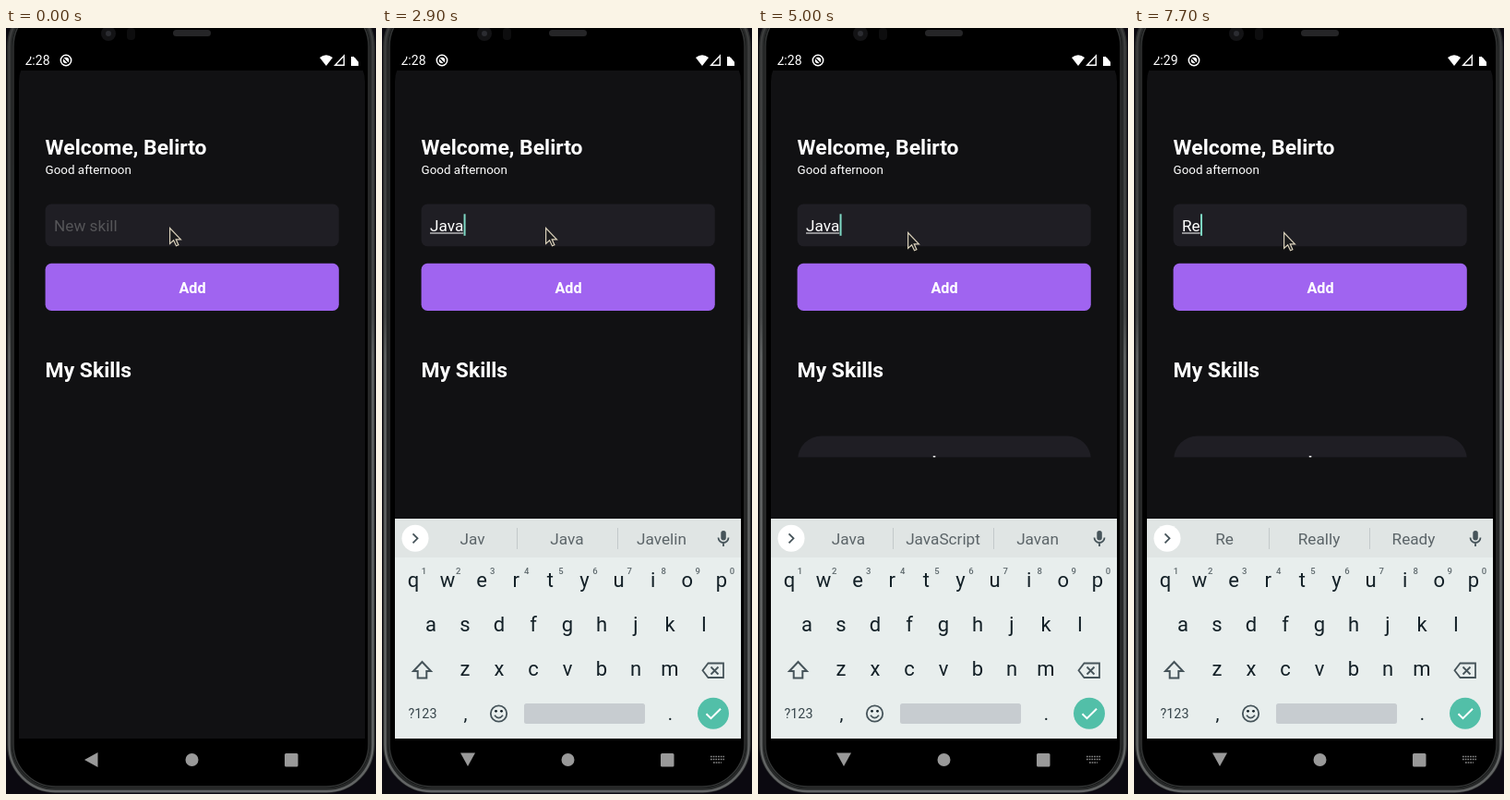
An HTML page for the animation above (8 s loop, 401x829 px).

```html
<!DOCTYPE html>
<html lang="en">
<head>
<meta charset="utf-8">
<title>My Skills</title>
<style>
html, body { margin: 0; width: 100%; height: 100%; overflow: hidden; background: #0b0910; }
svg { display: block; width: 401px; height: 829px; font-family: Roboto, sans-serif; }
.mid { text-anchor: middle; }
.bold { font-weight: 700; }
.line { fill: none; stroke: #46545a; stroke-width: 1.8; }
</style>
</head>
<body>
<svg viewBox="0 0 401 829">
  <defs>
    <clipPath id="screen"><rect x="14" y="22" width="375" height="793" rx="36"/></clipPath>
    <clipPath id="list"><rect x="43" y="430" width="318" height="34.5"/></clipPath>
    <linearGradient id="rim" x2="0" y2="1">
      <stop offset="0" stop-color="#3a3b3b"/><stop offset=".4" stop-color="#484a4a"/>
      <stop offset=".45" stop-color="#626565"/><stop offset="1" stop-color="#626464"/>
    </linearGradient>
  </defs>

  <!-- phone body -->
  <g fill="none">
    <rect x="4" y="-30" width="393" height="855" rx="50" fill="#000" stroke="#262828" stroke-width="6"/>
    <rect x="3.5" y="-30" width="394" height="856" rx="50" stroke="url(#rim)" stroke-width="2.5"/>
    <rect x="8" y="-26" width="385" height="847" rx="46" stroke="#343636" stroke-width="1.500"/>
  </g>
  <rect x="181" y="2" width="41" height="7" rx="3.5" fill="#252527"/>
  <circle cx="111" cy="6" r="8" fill="#131315"/>
  <circle cx="111" cy="6" r="3" fill="#2b2c31"/>
  <rect x="131" y="0" width="9" height="13" rx="4" fill="#0d0d0e"/>

  <g clip-path="url(#screen)">
    <rect x="14" y="46" width="375" height="723" fill="#111113"/>

    <!-- status bar -->
    <g fill="#fff">
      <text id="clock" x="20.5" y="40" font-size="14"></text>
      <circle cx="65" cy="35" r="5.7" fill="none" stroke="#fff" stroke-width="1.5"/>
      <circle cx="65" cy="35" r="3.2"/>
      <path d="M62.5 33L67.5 38" stroke="#000" stroke-width="1.2"/>
      <path d="M340 32Q347 26.500 354 32L347 41Z"/>
      <path d="M366.300 30V40.300H356.700Z" fill="none" stroke="#fff" stroke-width="1.4"/>
      <path d="M374 31H376V29.500H380V31H382V41H374Z"/>
    </g>

    <!-- app -->
    <g fill="#fff">
      <text class="bold" x="42.600" y="137" font-size="22.900">Welcome, Belirto</text>
      <text x="42.600" y="158" font-size="13.400">Good afternoon</text>
      <rect x="42.600" y="190.500" width="318.200" height="45.700" rx="6.700" fill="#1f1e24"/>
      <text id="hint" x="52" y="220" font-size="17.200" fill="#555558">New skill</text>
      <text id="typed" x="52" y="220" font-size="17.200"></text>
      <rect id="under" x="52" y="221.500" height="1"/>
      <g id="caret" fill="#7ed8c4">
        <rect x=".3" y="201.300" width="2" height="23.500"/>
        <path id="drop" fill="#52bfa8" d="M1 226L7.400 232.400A9.100 9.100 0 1 1 -5.400 232.400Z"/>
      </g>
      <g id="button">
        <rect x="42.600" y="254.800" width="318.200" height="51.200" rx="6.700" fill="#a064f0"/>
        <text class="mid bold" x="202" y="287" font-size="16.200">Add</text>
      </g>
      <text class="bold" x="42.600" y="378" font-size="22.900">My Skills</text>
      <g id="item" clip-path="url(#list)">
        <rect x="43" y="441.500" width="318" height="52" rx="26" fill="#1f1e24"/>
        <text class="mid bold" x="202" y="474.800" font-size="17.200">Java</text>
      </g>
    </g>

    <!-- navigation bar -->
    <rect x="14" y="769" width="375" height="46"/>
    <g fill="#999">
      <path id="back" d="M-8 0L6.500 -8V8Z"/>
      <circle cx="201.500" cy="792" r="7"/>
      <rect x="302" y="785" width="14.500" height="14.500" rx="1.500"/>
      <path id="ime" d="M356 788.500H371M356 791.500H371M359 795H368" stroke="#888" stroke-width="1.500" stroke-dasharray="1.700 1"/>
    </g>

    <!-- keyboard -->
    <g id="board" fill="#132027">
      <rect x="14" y="531" width="375" height="238" fill="#e8eeed"/>
      <rect x="14" y="531" width="375" height="42" fill="#e0e5e4"/>
      <circle cx="36" cy="552.300" r="14.500" fill="#fff"/>
      <path id="chevron" class="line" d="M-2.500 -5L2.500 0L-2.500 5"/>
      <g id="tools" fill="#55636a">
        <g class="line">
          <circle cx="84.500" cy="551" r="5.200"/>
          <path d="M88.500 555L94.500 561" stroke-width="2.300"/>
          <path stroke-width="1.500" d="M135 545.500H146Q148 545.500 148 547.500V554L143 559.500H135Q133 559.500 133 557.500V547.500Q133 545.500 135 545.500ZM148 554H143V559.500M136.500 553.500Q139 557 142 554.500"/>
        </g>
        <circle cx="137.500" cy="550" r="1.200"/><circle cx="143.500" cy="550" r="1.200"/>
        <text class="mid" x="194.500" y="557" font-size="13" font-weight="900" letter-spacing=".6">GIF</text>
        <rect x="242.500" y="545.500" width="15.500" height="15.500" rx="1.500"/>
        <path d="M283.500 542V563" stroke="#ccd1d2"/>
        <circle cx="311.500" cy="553" r="2"/><circle cx="317.500" cy="553" r="2"/><circle cx="323.500" cy="553" r="2"/>
      </g>
      <g id="words" fill="#5b6468">
        <path d="M146.500 541V564M255.500 541V564" stroke="#c3c9ca"/>
      </g>
      <rect x="367.300" y="544" width="5.500" height="10.500" rx="2.750" fill="#46545a"/>
      <path class="line" d="M364.500 551.500A5.500 5.500 0 0 0 375.500 551.500M370 557V561"/>
      <g id="keys"></g>
      <path id="shift" d="M43.500 686L53 696H48.300V703.500H38.700V696H34Z" stroke="#46545a" stroke-width="2"/>
      <path class="line" d="M353.500 687.500H370V703H353.500L347.500 695.250ZM356.500 691.500L364.500 699.500M364.500 691.500L356.500 699.500"/>
      <text class="mid" x="44" y="747" font-size="14.300" fill="#37454b">?123</text>
      <text class="mid" x="90.500" y="749" font-size="20">,</text>
      <circle class="line" cx="126.500" cy="742" r="8.700"/>
      <circle cx="123.500" cy="739.300" r="1.400"/><circle cx="129.500" cy="739.300" r="1.400"/>
      <path class="line" stroke-width="1.500" d="M122 743.700Q126.500 749.500 131 743.700"/>
      <rect x="154" y="731" width="131" height="22" rx="2.500" fill="#c7ccd0"/>
      <text class="mid" x="312.500" y="749" font-size="20">.</text>
      <circle cx="359" cy="741.700" r="17" fill="#52bfa8"/>
      <path d="M351.500 742.200L356.500 747.200L367 736.700" fill="none" stroke="#fff" stroke-width="2"/>
    </g>

    <path id="mouse" d="M.6 .6V17.500L4.600 13.800L7.500 19.800L9.900 18.700L7.200 12.800H12.400Z" fill="#1b1b1d" stroke="#d9d0ba" stroke-width="1.200"/>
  </g>
</svg>
<script>
const $ = id => document.getElementById(id);
const LOOP = 8000;
const ROWS = [['qwertyuiop', 34, 37.1], ['asdfghjkl', 53, 37], ['zxcvbnm', 90, 37]];

// Each track holds [start time, value] steps.
const typing = [[0, ''], [2400, 'J'], [2500, 'Ja'], [2800, 'Jav'], [2900, 'Java'],
  [6200, 'Jav'], [6300, 'Ja'], [6500, ''], [7600, 'R'], [7700, 'Re']];
const hints = [[0, ''], [2400, 'J Just I'], [2500, 'Ja January Jacket'], [2900, 'Jav Java Javelin'],
  [3200, 'Java JavaScript Javan'], [6200, 'Jav Java Javelin'], [6300, 'Ja January Jacket'],
  [6500, 'J Just I'], [6700, ''], [7600, 'R Right Really'], [7700, 'Re Really Ready']];
const caretOn = [[0, 0], [500, 1], [1000, 0], [1500, 1], [2000, 0], [2400, 1], [3400, 0], [4000, 1],
  [4500, 0], [5000, 1], [5900, 0], [6200, 1], [7300, 0], [7600, 1]];
const mousePos = [[0, [177, 216]], [3600, [203, 246]], [3700, [196, 261]],
  [4700, [184, 245]], [4800, [168, 228]], [4900, [162, 221]]];

const at = (track, t) => track.filter(s => s[0] <= t).pop()[1];
const ramp = (t, from, span) => Math.min(1, Math.max(0, (t - from) / span));
const show = (id, on) => $(id).style.display = on ? '' : 'none';
const set = (id, name, value) => $(id).setAttribute(name, value);

function label(parent, x, y, size, str = '') {
  const el = document.createElementNS('http://www.w3.org/2000/svg', 'text');
  el.setAttribute('class', 'mid');
  el.setAttribute('x', x);
  el.setAttribute('y', y);
  el.setAttribute('font-size', size);
  el.textContent = str;
  return $(parent).appendChild(el);
}

const keys = [];
ROWS.forEach(([letters, x, step], row) => [...letters].forEach((char, i) => {
  const kx = x + i * step;
  keys.push({ char, row, el: label('keys', kx, 0, 22) });
  if (!row) {
    const digit = label('keys', kx + 11.5, 590.5, 9.5, (i + 1) % 10);
    digit.setAttribute('fill', '#5f6a6e');
    digit.setAttribute('font-weight', 500);
  }
}));
const words = [98, 200.5, 303].map(x => label('words', x, 559, 17.2));

function render(t) {
  const text = at(typing, t), list = at(hints, t), open = t >= 500;
  $('clock').textContent = t < 6800 ? '2:28' : '2:29';

  // input field
  $('typed').textContent = text;
  show('hint', !text);
  const width = text ? $('typed').getComputedTextLength() : 0;
  set('under', 'width', width);
  set('caret', 'transform', `translate(${52 + width} 0)`);
  $('caret').firstElementChild.style.opacity = at(caretOn, t);
  set('drop', 'opacity', t < 6200 ? ramp(t, 5300, 300) : 0);

  // button press and new list entry
  const press = ramp(t, 4100, 200) - ramp(t, 4400, 300);
  set('button', 'opacity', 1 - 0.3 * press);
  show('item', t >= 4500);

  // keyboard slides and fades in
  const gap = (1 - ramp(t, 400, 300)) ** 3;
  show('board', open);
  set('board', 'opacity', 1 - 1.2 * gap);
  set('board', 'transform', `translate(0 ${Math.round(27 * gap)})`);
  show('ime', open);
  set('back', 'transform', open
    ? `translate(93 791) rotate(${-90 * ramp(t, 400, 200)})` : 'translate(93 792)');

  const upper = !text || t === 2400 || t === 7600;
  for (const k of keys) {
    k.el.textContent = upper ? k.char.toUpperCase() : k.char;
    k.el.setAttribute('y', (upper ? 607.3 : 605.3) + 48 * k.row);
  }
  set('shift', 'fill', upper ? '#46545a' : 'none');
  show('tools', !list);
  show('words', list);
  set('chevron', 'transform', `translate(36 552.3) scale(${list ? 1 : -1} 1)`);
  list.split(' ').forEach((w, i) => words[i].textContent = w);

  set('mouse', 'transform', `translate(${at(mousePos, t)})`);
}

function tick(now) {
  render(Math.floor(now % LOOP / 100) * 100);
  requestAnimationFrame(tick);
}
render(0);
requestAnimationFrame(tick);
</script>
</body>
</html>
```
